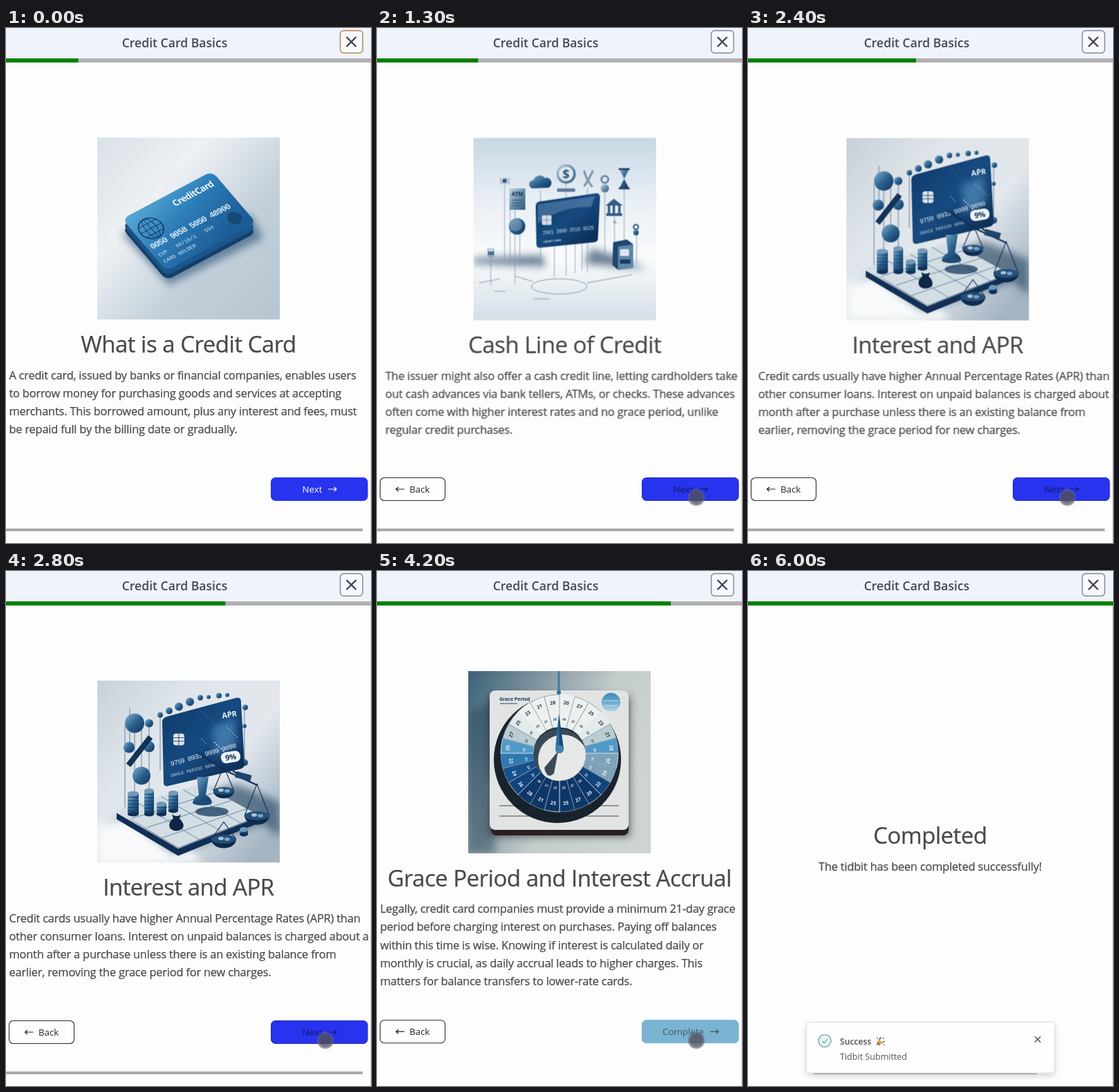
An HTML page that plays this animation: 528 by 746 pixels, repeating every 6.5 s.

```html
<!DOCTYPE html>
<html lang="en">
<head>
<meta charset="utf-8">
<title>Credit Card Basics</title>
<style>
html, body { margin: 0; width: 100%; height: 100%; overflow: hidden; background: #fdfdfd; }
svg { display: block; width: 528px; height: 746px; font-family: "Open Sans", "Noto Sans", sans-serif; }
text { white-space: pre; }
.h { font-size: 33px; letter-spacing: -.015em; fill: #47474c; stroke: #47474c; stroke-width: .25px; text-anchor: middle; }
.p { font-size: 16.4px; letter-spacing: -.012em; fill: #4a4a4f; stroke: #4a4a4f; stroke-width: .25px; }
.btn { font-size: 13.3px; }
.mono { font-family: "Liberation Mono", monospace; }
</style>
</head>
<body>
<svg id="stage" viewBox="0 0 528 746"></svg>
<script>
const LOOP = 6500;

// Markup helpers
const el = (tag, attrs, body = '') =>
  `<${tag} ${Object.entries(attrs).map(([k, v]) => `${k}="${v}"`).join(' ')}>${body}</${tag}>`;
const rect = (x, y, width, height, fill, more) => el('rect', { x, y, width, height, fill, ...more });
const disc = (cx, cy, r, fill, more) => el('circle', { cx, cy, r, fill, ...more });
const oval = (cx, cy, rx, ry, fill, more) => el('ellipse', { cx, cy, rx, ry, fill, ...more });
const shape = (d, fill, more) => el('path', { d, fill, ...more });
const line = (d, stroke, width = 1, more) => shape(d, 'none', { stroke, 'stroke-width': width, ...more });
const label = (x, y, size, fill, str, more) => el('text', { x, y, 'font-size': size, fill, ...more }, str);
const group = (transform, body, more) => el('g', { transform, ...more }, body);
const grad = (id, x2, y2, ...stops) => el('linearGradient', { id, x2, y2 },
  stops.map((c, i) => `<stop offset="${i / (stops.length - 1)}" stop-color="${c}"/>`).join(''));
const arrow = (x, dir) => line(`M${x} 668h${12 * dir}m${-3.5 * dir} -3l${3.5 * dir} 3l${-3.5 * dir} 3`, 'currentColor', 1.2);
const cross = (x, y, r, color, w) => line(`M${x - r} ${y - r}l${2 * r} ${2 * r}m0 ${-2 * r}l${-2 * r} ${2 * r}`, color, w);
const soft = { filter: 'url(#soft)' };

const defs = el('defs', {},
  grad('bg1', 1, .9, '#d9e0e7', '#eef1f4', '#c3d0da', '#b7c6d2') +
  grad('card1', .6, 1, '#5aaad8', '#2c7db8', '#1d5d97') +
  grad('bg2', 0, 1, '#c7d7e5', '#e9eff5', '#fafbfc', '#d5dee8') +
  grad('navy', 1, 1, '#0e3a6c', '#164a80', '#0a264a') +
  grad('ball', 1, 1, '#86b0d0', '#2a628f', '#0f3159') +
  grad('steel', 1, 1, '#c5d6e3', '#6d92af', '#2d567c') +
  grad('bg3', 1, .8, '#c8d1d9', '#dfe5ea', '#e3e8ed', '#a3b4c2') +
  grad('bg4', 1, .5, '#3a6079', '#82969f', '#c4cccc', '#cdd4d3') +
  grad('sun', 0, 1, '#3f87b8', '#69a9cf', '#b9d6e2') +
  `<filter id="soft" x="-50%" y="-50%" width="200%" height="200%"><feGaussianBlur stdDeviation="6"/></filter>
   <filter id="drop" x="-10%" y="-30%" width="120%" height="170%"><feDropShadow dx="0" dy="4" stdDeviation="4" flood-opacity=".16"/></filter>
   <clipPath id="frame"><rect width="264" height="264"/></clipPath>
   <clipPath id="hole"><circle cx="132" cy="121" r="38"/></clipPath>
   <radialGradient id="dot"><stop offset=".6" stop-color="#505056" stop-opacity=".8"/><stop offset=".85" stop-color="#5d6070" stop-opacity=".65"/><stop offset="1" stop-color="#7078a0" stop-opacity=".08"/></radialGradient>`);

// Illustrations, each on a 264 x 264 square
function blueCard() {
  const ink = '#123a63', pale = '#d7e8f3';
  const face = rect(0, 0, 150, 100, 'url(#card1)', { rx: 10 }) +
    label(73, 21, 13.5, '#f1f7fb', 'CreditCard', { 'font-weight': 700, 'letter-spacing': -.6 }) +
    disc(24, 33, 17, 'none', { stroke: ink, 'stroke-width': 1.6 }) +
    oval(24, 33, 8, 17, 'none', { stroke: ink }) +
    line('M7 33h34M10 24h28M10 42h28M24 16v34', ink) +
    label(5, 62, 12.6, pale, '0050 9058 5050 48900', { class: 'mono', 'letter-spacing': -1, 'font-weight': 700 }) +
    label(6, 77, 8, pale, 'CVP   06/18/1   504', { class: 'mono' }) +
    label(6, 89, 8, pale, 'CARD HOLDER', { class: 'mono' }) +
    disc(130, 78, 10, '#154873');
  const plane = 'matrix(.867 -.46 .64 .75 ';
  return rect(0, 0, 264, 264, 'url(#bg1)') +
    shape('M34 138L104 214L240 146L222 112Z', '#15406b', { ...soft, opacity: .55 }) +
    group(plane + '36 132)', rect(0, 0, 150, 100, '#123f6c', { rx: 10 })) +
    group(plane + '36 126)', rect(0, 0, 150, 100, '#1c5588', { rx: 10 })) +
    group(plane + '36 118)', face);
}

function cashLine() {
  const ink = '#2c557c';
  const stems = [[25, 168, 214], [45, 68, 178], [53, 74, 185], [60, 100, 212], [67, 138, 185], [97, 76, 186], [117, 150, 202],
    [134, 66, 200], [147, 150, 196], [157, 145, 192], [165, 72, 195], [190, 80, 170], [204, 110, 160], [218, 70, 150], [236, 140, 180]]
    .map(([x, a, b]) => `M${x} ${a}V${b}`).join('');
  const glass = (x, y, s) => shape(`M${x - s} ${y - 2 * s}h${2 * s}L${x} ${y}l${s} ${2 * s}h${-2 * s}L${x} ${y}Z`, 'url(#ball)') +
    line(`M${x - s - 1} ${y - 2 * s}h${2 * s + 2}m0 ${4 * s}h${-2 * s - 2}`, '#173d66', 2.5);
  return rect(0, 0, 264, 264, 'url(#bg2)') +
    shape('M0 174L100 170L104 186L0 182ZM170 160L210 172L250 190L160 182Z', '#1d3e61', { ...soft, opacity: .65 }) +
    line(stems, '#8196aa', .8) +
    line('M84 215a40 11 0 1 0 80 0a40 11 0 1 0 -80 0M8 210l30 -6M60 200l26 8M164 210l66 -12M110 233h-24M30 222h16', '#6d8297', .8) +
    shape('M96 92L178 80Q183 80 183 86L180 146Q180 150 175 151L96 159Q91 159 91 154L90 99Q90 93 96 92Z', 'url(#navy)') +
    shape('M93 96L176 84L170 100Q130 98 93 124Z', '#8fb6d6', { opacity: .35 }) +
    rect(99, 112, 14, 14, '#d5dee6', { rx: 2 }) + line('M99 119h14M106 112v14', '#5c7890', .7) +
    group('translate(100 140) rotate(-6)',
      label(0, 0, 8, '#bcd0e2', '2501 3900 2510 9529', { class: 'mono', 'letter-spacing': -.9 }) +
      label(0, 12, 4, '#dce7f0', 'CREDIT CARD', { 'font-weight': 700 })) +
    shape('M86 73a6 6 0 0 1 1 -12a9 9 0 0 1 16 -3a7 7 0 0 1 5 14Z', 'url(#ball)') +
    disc(134, 52, 14, 'url(#steel)') + disc(134, 52, 10.5, '#dfe8ef') +
    label(134, 58.5, 18, ink, '$', { 'text-anchor': 'middle', 'font-weight': 700 }) +
    rect(121, 73, 26, 5, '#5d7d99') +
    line('M160 47q3 13 12 24M173 47q-5 12 -13 23', '#7b95ab', 3) +
    disc(190, 60, 5, 'none', { stroke: '#5c7e9b', 'stroke-width': 2.5 }) + disc(190, 73, 6, 'url(#steel)') +
    glass(218, 59, 7) +
    rect(52, 73, 23, 31, 'url(#steel)') + label(63.5, 84, 8, '#122f4e', 'ATM', { 'text-anchor': 'middle', 'font-weight': 700 }) +
    line('M56 90h15M56 94h15M56 98h11', '#2a4f73') +
    disc(63, 128, 12, 'url(#ball)') + disc(61, 126, 9, '#819fb8', { opacity: .6 }) +
    rect(38, 58, 15, 9, '#bdc9d3') + disc(45, 62, 3, ink) +
    shape('M191 98L203 88L216 98ZM192 109h23v4h-23Z', '#345f87') + line('M196 98v11M203 98v11M211 98v11', '#345f87', 3.5) +
    label(202, 124, 6, ink, '%') +
    shape('M202 151L222 147L231 154V188L209 191L201 184Z', '#1f466e') + shape('M209 157L231 154V188L209 191Z', '#5e86a6') +
    rect(212, 161, 13, 10, '#dbe6ee') + rect(212, 176, 15, 6, '#183a5c') +
    rect(21, 161, 8, 11, 'none', { stroke: '#73889b' }) + rect(21, 164, 9, 6, '#4f7698') +
    disc(235, 129, 3.5, 'none', { stroke: ink, 'stroke-width': 2 }) + disc(235, 137, 4, 'url(#ball)');
}

function aprCard() {
  const ink = '#102f56', white = '#eef4f8';
  const balls = [[54, 62, 14], [46, 97, 8], [75, 96, 8], [64, 138, 13], [75, 62, 6], [91, 50, 4], [104, 44, 5], [118, 38, 6],
    [134, 31, 6], [149, 25, 4], [161, 24, 3], [176, 22, 4], [188, 21, 3], [214, 39, 4], [213, 66, 3], [213, 119, 5]];
  const stack = (x, y, h, r) => rect(x - r, y, 2 * r, h, 'url(#ball)') + oval(x, y + h, r, 3, ink) + oval(x, y, r, 3.4, '#7299b8') +
    line(Array.from({ length: h / 5 | 0 }, (_, i) => `M${x - r} ${y + 5 + i * 5}h${2 * r}`).join(''), ink, .7);
  const pan = (x, y, r, top) => line(`M${x - r} ${y}L${x} ${top}L${x + r} ${y}`, ink, 1.1) +
    shape(`M${x - r} ${y}a${r} ${r * .72} 0 0 0 ${2 * r} 0Z`, '#0d2a4b') + oval(x, y, r, r * .36, '#234f79') +
    oval(x - 4, y - 1, 4, 2.4, '#a9c3d6') + oval(x + 5, y, 4, 2.4, '#7da2bd');
  const stars = Array.from({ length: 26 }, (_, i) =>
    disc(150 + i * 37 % 54, 44 + i * 23 % 66, .4 + i % 3 * .3, '#c7e0f2')).join('');
  return rect(0, 0, 264, 264, 'url(#bg3)') +
    shape('M0 205L90 190L150 264H0Z', '#f7f9fa', soft) +
    shape('M0 212L40 196L110 250L240 208L264 226V176L200 150Z', '#1c3c5a', { ...soft, opacity: .6 }) +
    shape('M28 192L117 244L235 198V206L117 254L28 201Z', ink) +
    shape('M28 188L150 150L235 196L117 242Z', '#d3dde4') +
    line('M50 200L172 162M72 213L194 174M94 228L216 186M60 178L148 231M92 168L180 219M124 158L208 207', '#5f7f99', .9) +
    oval(166, 190, 24, 7, '#163a60', { opacity: .75 }) +
    line('M40 66V184M54 74V165M75 66V160M91 52V130M213 40V120M64 60V130M47 40V90', '#4b6b88', .8) +
    balls.map(([x, y, r]) => disc(x, y, r, 'url(#ball)')).join('') +
    line('M45 123L77 82', '#123257', 8) +
    shape('M102 52L202 25Q208 24 208 31L213 121Q213 126 208 128L102 153Q96 154 96 148L94 60Q94 54 102 52Z', 'url(#navy)') +
    shape('M166 70L198 54L202 92L172 110Z', '#5b9bcb', { ...soft, opacity: .6 }) + stars +
    group('translate(181 55) rotate(-9)', label(0, 0, 11, white, 'APR', { 'font-weight': 700 })) +
    rect(110, 77, 16, 17, '#dce5eb', { rx: 4 }) + line('M110 83h16M110 88h16M118 77v17', ink, .8) +
    group('translate(107 124) rotate(-16)', label(0, 0, 9.5, white, '9759 0933 9999 9090', { class: 'mono', 'letter-spacing': -.55 })) +
    group('translate(107 140) rotate(-14)', label(0, 0, 6.5, '#c8d9e5', 'GRACE PERIOD 9090', { class: 'mono' })) +
    group('translate(193 111) rotate(-9)', rect(-14, -8, 28, 16, white, { rx: 7 }) +
      label(0, 4, 11, ink, '9%', { 'text-anchor': 'middle', 'font-weight': 700 })) +
    shape('M144 140h17l-4 26q8 4 9 11h-28q1 -7 9 -11Z', 'url(#ball)') + oval(152, 177, 14, 4, '#1d4b75') +
    stack(52, 164, 30, 8) + stack(75, 160, 34, 7) + stack(110, 163, 26, 7) + stack(93, 179, 15, 7) + stack(212, 216, 7, 6) +
    shape('M108 194q7 5 13 0l-2 6q9 9 4 15q-9 6 -17 0q-5 -8 4 -15Z', '#0c2745') +
    line('M146 105L184 130L232 152M196 131L220 146', ink, 2.4) + rect(200, 134, 23, 9, '#1d446c', { transform: 'rotate(15 210 138)' }) +
    pan(183, 160, 15, 125) + pan(231, 196, 18, 150) + pan(183, 230, 18, 205);
}

function graceWheel() {
  const C = 132, R = 85, r = 38, cy = 119, n = 24;
  const at = (a, d) => `${(C + d * Math.sin(a)).toFixed(1)} ${(cy - d * Math.cos(a)).toFixed(1)}`;
  const tones = ['#edf0ef', '#e4e9ea', '#b9cdd3', '#5299c8', '#2f78b0', '#15518d', '#11437c', '#0e3768'];
  const wedges = Array.from({ length: n }, (_, i) => {
    const a = i * 2 * Math.PI / n, b = (i + 1) * 2 * Math.PI / n, m = (a + b) / 2;
    const k = Math.min(7, (1 - Math.cos(m)) * 4 | 0), right = m < Math.PI;
    const tone = right && k > 3 && k < 6 ? '#7ea3b8' : tones[k];
    const ink = k < 3 ? '#26384a' : '#eef4f8', deg = (m > Math.PI / 2 && m < Math.PI * 1.5 ? m - Math.PI : m) * 180 / Math.PI;
    const num = (d, size) => { const [x, y] = at(m, d).split(' ');
      return label(0, 0, size, ink, 20 + i * 7 % 9, { transform: `translate(${x} ${+y + 2}) rotate(${deg})`, 'text-anchor': 'middle', 'font-weight': 700 }); };
    return shape(`M${at(a, r)}L${at(a, R)}A${R} ${R} 0 0 1 ${at(b, R)}L${at(b, r)}Z`, tone, { stroke: i % 3 ? '#7d9cae' : '#eef2f3', 'stroke-width': .8 }) +
      num(73, 7) + num(50, 4.5);
  }).join('');
  const hole = disc(C, cy + 2, r, '#3a4a56') + disc(C + 5, cy + 9, r - 2, '#e6e8e7') +
    shape(`M${C - 2} 116L110 140Q114 158 124 148Z`, '#2b3944', { opacity: .9 });
  return rect(0, 0, 264, 264, 'url(#bg4)') +
    shape('M0 60L70 30L30 170L40 264H0Z', '#1d3f55', { ...soft, opacity: .45 }) +
    rect(30, 36, 203, 203, '#26292f', { ...soft, opacity: .75 }) +
    rect(33, 36, 199, 202, '#2a1f22', { rx: 8 }) + rect(31, 28, 201, 202, '#e1e4e2', { rx: 8 }) +
    label(45, 43, 7.2, '#173b5e', 'Grace Period', { 'font-weight': 700, 'letter-spacing': -.1 }) +
    line('M46 47h25M45 195h173M45 210h173', '#394650', 1) +
    disc(206.5, 45, 13.5, 'url(#sun)') + line('M195 43h23M197 50h18', '#e4eef2', .8) +
    disc(129, 128, 92, '#0f1924', { opacity: .95 }) +
    wedges + el('g', { 'clip-path': 'url(#hole)' }, hole) +
    line('M131 0V31', '#3a7ba8', 3) + disc(131, 31, 3, '#2f6d9c') +
    shape('M131 62L126 113a6 6 0 1 0 12 0Z', '#2b6da0') + shape('M131 62L132 114L138 113Z', '#174a76') + disc(132, 113, 6, '#3f83b3');
}

// Slides: pressed = when its button is clicked, enter = when it mounts, fill = when the bar starts towards its level
const slides = [
  { art: blueCard, top: 158.5, title: 'What is a Credit Card', enter: -900, fill: -900, level: .198, pressed: 780, lines: [
    'A credit card, issued by banks or financial companies, enables users',
    'to borrow money for purchasing goods and services at accepting',
    'merchants. This borrowed amount, plus any interest and fees, must',
    'be repaid full by the billing date or gradually.'] },
  { art: cashLine, top: 158.5, title: 'Cash Line of Credit', enter: 1080, fill: 1180, level: .4, pressed: 1830, lines: [
    'The issuer might also offer a cash credit line, letting cardholders take',
    'out cash advances via bank tellers, ATMs, or checks. These advances',
    'often come with higher interest rates and no grace period, unlike',
    'regular credit purchases.'] },
  { art: aprCard, top: 158.5, title: 'Interest and APR', enter: 2200, fill: 2300, level: .601, pressed: 2980, lines: [
    'Credit cards usually have higher Annual Percentage Rates (APR) than',
    'other consumer loans. Interest on unpaid balances is charged about a',
    'month after a purchase unless there is an existing balance from',
    'earlier, removing the grace period for new charges.'] },
  { art: graceWheel, top: 145, title: 'Grace Period and Interest Accrual', enter: 3410, fill: 3507, level: .805, pressed: 4190, lines: [
    'Legally, credit card companies must provide a minimum 21-day grace',
    'period before charging interest on purchases. Paying off balances',
    'within this time is wise. Knowing if interest is calculated daily or',
    'monthly is crucial, as daily accrual leads to higher charges. This',
    'matters for balance transfers to lower-rate cards.'] },
  { title: 'Completed', enter: 4450, fill: 5000, level: 1, pressed: 6000 }
];

const slideMarkup = s => el('g', { class: 'slide' }, s.art
  ? group(`translate(132 ${s.top})`, s.art(), { 'clip-path': 'url(#frame)' }) +
    el('text', { class: 'h', x: 264, y: s.top + 311.5 }, s.title) +
    s.lines.map((str, i) => el('text', { class: 'p', x: 4.5, y: s.top + 350.2 + i * 26.15 }, str)).join('')
  : el('text', { class: 'h', x: 263.5, y: 395 }, s.title) +
    el('text', { class: 'p', x: 263.5, y: 433.5, 'text-anchor': 'middle' }, 'The tidbit has been completed successfully!'));

const toast = el('g', { id: 'toast' },
  line('M95 728.2H418', '#8f8f92', 1.2) +
  rect(84.5, 653.5, 359, 73.5, '#fefefe', { rx: 6, stroke: '#dcdde0', filter: 'url(#drop)' }) +
  disc(111, 680.5, 9, '#e6f3f2', { stroke: '#86b5b0', 'stroke-width': 1.7 }) + line('M107.5 681l2.6 2.8l4.6 -6', '#78aaa8', 1.3) +
  label(133, 686, 12.2, '#4c4c50', 'Success', { 'font-weight': 600 }) +
  shape('M185 688l4 -10l6 6Z', '#d9a441') + line('M187 683l4 4M190 679q1 -3 3 -3M194 683q2 -2 4 -1', '#47506a', 1.3) +
  disc(187, 677, 1, '#c3506a') + disc(196, 677, 1.1, '#4a7fc0') + disc(197, 686, 1, '#6b9b57') +
  label(133, 708, 12.55, '#55555a', 'Tidbit Submitted') + cross(419, 678.5, 4.3, '#4a4a4e', 1.3));

const stage = document.getElementById('stage');
stage.innerHTML = defs + rect(0, 0, 528, 746, '#fdfdfd') +
  slides.map(slideMarkup).join('') +
  rect(0, 725, 516, 4, '#a9a9a9', { id: 'scroll' }) +
  el('g', { id: 'buttons' },
    el('g', { id: 'back', color: '#222' }, rect(4.5, 651.5, 94, 33, '#fefefe', { rx: 6, stroke: '#2c2c30', 'stroke-width': 1.1 }) +
      arrow(39.5, -1) + el('text', { class: 'btn', x: 47, y: 673, fill: '#222' }, 'Back')) +
    el('g', { id: 'go' }, rect(383.5, 651.5, 139.5, 33, '#2733ee', { id: 'face', rx: 6 }) +
      el('g', { id: 'next' }, el('text', { class: 'btn', x: 428.5, y: 673, fill: 'currentColor' }, 'Next') + arrow(466, 1)) +
      el('g', { id: 'done' }, el('text', { class: 'btn', x: 413, y: 673, fill: 'currentColor' }, 'Complete') + arrow(482, 1)))) +
  rect(0, 0, 528, 44, '#eff3fb') + rect(0, 44, 528, 6, '#b1b1b1') + rect(0, 44, 0, 6, '#008000', { id: 'bar' }) +
  label(244, 27.5, 17.6, '#414a57', 'Credit Card Basics', { 'font-weight': 600, 'text-anchor': 'middle' }) +
  rect(483.5, 3.8, 32.5, 32.5, '#f6f8fd', { id: 'close', rx: 5, 'stroke-width': 1.5 }) + cross(499.5, 20, 7, '#3d4250', 2.3) +
  rect(527, 50, 1, 696, '#d2d2d4') + toast + disc(0, 0, 13, 'url(#dot)', { id: 'cursor' });

const $ = id => document.getElementById(id);
const groups = [...stage.querySelectorAll('.slide')];
const set = (node, attrs) => { for (const k in attrs) node.setAttribute(k, attrs[k]); };
const show = (node, on) => set(node, { visibility: on ? 'visible' : 'hidden' });
const span = (t, a, b) => Math.min(1, Math.max(0, (t - a) / (b - a)));
const outCubic = u => 1 - (1 - u) ** 3;
const mix = (a, b, k) => `rgb(${a.map((v, i) => Math.round(v + (b[i] - v) * k))})`;

// CSS "ease": cubic-bezier(.25, .1, .25, 1)
function ease(u) {
  const bez = (s, p, q) => 3 * s * (1 - s) ** 2 * p + 3 * s * s * (1 - s) * q + s ** 3;
  let lo = 0, hi = 1;
  for (let i = 0; i < 20; i++) {
    const mid = (lo + hi) / 2;
    if (bez(mid, .25, .25) < u) lo = mid; else hi = mid;
  }
  return bez(lo, .1, 1);
}

function draw(t) {
  let level = 0, flash = 0, step = 0, scroll = false;
  slides.forEach((s, i) => {
    const last = i === slides.length - 1;
    const out = last ? 0 : span(t, s.pressed + 30, s.pressed + 70);
    const x = 84 * (1 - outCubic(span(t, s.enter, s.enter + 400)));
    const fade = outCubic(span(t, s.enter, s.enter + 250));
    set(groups[i], { transform: `translate(${x} ${x / 10})`, opacity: fade * (1 - out) });
    show(groups[i], t >= s.enter && out < 1);
    if (t >= s.enter) step = i;
    if (t >= s.enter && t < s.pressed) scroll = true;
    level += (s.level - level) * ease(span(t, s.fill, s.fill + 500));
    if (!last && t >= s.pressed) flash = 1 - span(t, s.pressed + 30, s.pressed + 85);
  });
  set($('bar'), { width: 528 * level });
  show($('scroll'), scroll);

  const hover = t >= 250;
  const blue = [39, 51, 238], pale = [122, 180, 210];
  show($('buttons'), t < 5000);
  set($('buttons'), { transform: `translate(0 ${scroll ? 0 : -.8})` });
  set($('back'), { display: step > 0 ? 'inline' : 'none' });
  set($('next'), { display: step < 3 ? 'inline' : 'none' });
  set($('done'), { display: step < 3 ? 'none' : 'inline' });
  set($('face'), { fill: mix(blue, pale, flash), stroke: mix(hover ? [36, 46, 170] : blue, pale, flash) });
  set($('go'), { color: hover ? mix([24, 26, 84], [62, 84, 100], flash) : '#fff' });
  set($('close'), { stroke: t < 800 ? '#b48a55' : '#858995' });

  const go = outCubic(span(t, 100, 400));
  set($('cursor'), { cx: 510 - 48 * go, cy: 694 - 14 * go });
  show($('cursor'), t >= 100 && t < 6000);

  const rise = outCubic(span(t, 4550, 4880));
  set($('toast'), { transform: `translate(0 ${92 * (1 - rise)})`, opacity: rise });
}

const start = performance.now();
function tick() {
  draw((performance.now() - start) % LOOP);
  requestAnimationFrame(tick);
}
tick();
</script>
</body>
</html>
```
